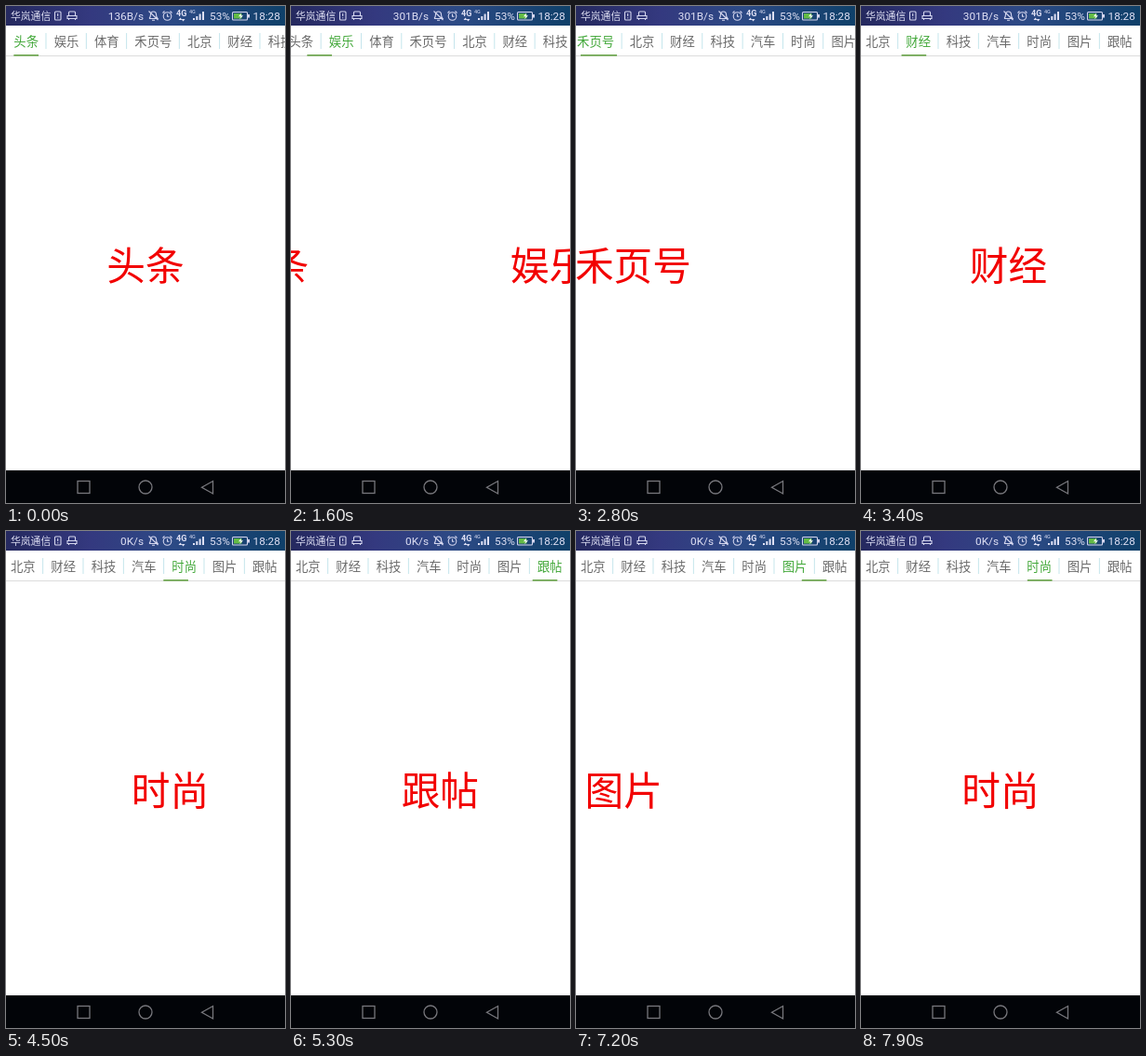
Recreate the animation shown at these times as an HTML page. Size 300 by 533 pixels, loop 8 s.

```html
<!DOCTYPE html>
<html lang="zh">
<head>
<meta charset="utf-8">
<title>Tab pager</title>
<style>
html, body { margin: 0; width: 100%; height: 100%; overflow: hidden; background: #fff; }
svg { display: block; width: 300px; height: 533px; }
text { font-family: "Noto Sans CJK SC", "Noto Sans CJK", sans-serif; }
.tab { font-size: 13.33px; fill: #6b6b6b; text-anchor: middle; }
.tab.on { fill: #43a83a; }
.page { font-size: 41.67px; fill: #f20000; text-anchor: middle; }
.bar text { fill: #dfe0f4; font-family: Roboto, "Noto Sans CJK SC", sans-serif; }
.line { fill: none; stroke: #d4d6ee; stroke-width: 1.1; }
.nav { fill: none; stroke: #77777c; stroke-width: 1.3; }
</style>
</head>
<body>
<svg viewBox="0 0 300 533">
  <defs>
    <linearGradient id="sky">
      <stop offset="0" stop-color="#25295f"/>
      <stop offset=".3" stop-color="#34397f"/>
      <stop offset=".6" stop-color="#2c4a85"/>
      <stop offset="1" stop-color="#0f4069"/>
    </linearGradient>
    <clipPath id="body"><rect y="54" width="300" height="444"/></clipPath>
  </defs>
  <rect width="300" height="533" fill="#fff"/>

  <g clip-path="url(#body)">
    <g id="pages"></g>
    <path id="glow" d="M340 53H272Q234 275 272 498H340Z" fill="#d0fbfc" stroke="#fbe2fb" stroke-width="3"/>
  </g>

  <rect y="53" width="300" height="1" fill="#dcdcdc"/>
  <g id="strip"><rect id="mark" y="52" height="1.7" fill="#6fa851"/></g>

  <g class="bar">
    <rect width="300" height="21" fill="url(#sky)"/>
    <text x="5" y="15" font-size="10.8">华岚通信</text>
    <g class="line">
      <rect x="52.5" y="6" width="6.5" height="9" rx="1"/>
      <path d="M55.7 8v3M55.7 12.2v1M67.5 10V7q0-1 1-1h5q1 0 1 1v3M66 10.5h10v3H66zM67.5 13.5v1.5M74.5 13.5v1.5"/>
      <path d="M154 13.5h9q-1.5-1.5-1.5-4.500q0-3-3-3t-3 3q0 3-1.500 4.500M157 15.300h3M153.500 5.500l10 9.500"/>
      <circle cx="173.500" cy="11" r="4.300"/>
      <path d="M173.500 8.500v2.700h2M168.500 7.500l2-2M178.500 7.500l-2-2"/>
    </g>
    <text id="speed" x="148" y="15" font-size="11.800" text-anchor="end"></text>
    <text x="183" y="11" font-size="9" font-weight="700">4G</text>
    <path d="M185.500 15l2-2.500 2 2.500zM188.500 14l2 2.500 2-2.500z" fill="#dfe0f4"/>
    <text x="197" y="8" font-size="5.500">4G</text>
    <path d="M201 15v-2h2v2zM204.300 15v-4h2v4zM207.600 15v-6.500h2v6.500zM211 15v-9h2v9z" fill="#dfe0f4"/>
    <text x="219" y="15" font-size="11.800">53%</text>
    <rect x="243.500" y="6.500" width="16" height="8.500" rx="1" class="line"/>
    <rect x="260" y="9" width="2" height="3.500" fill="#d4d6ee"/>
    <rect x="245" y="8" width="8.500" height="5.500" fill="#63bb45"/>
    <path d="M253 7.500l-3 3.700h2.500l-1.500 3 4-4h-2.500z" fill="#fff"/>
    <text x="265.500" y="15" font-size="11.800">18:28</text>
  </g>

  <rect y="498" width="300" height="35" fill="#020408"/>
  <g class="nav">
    <rect x="77" y="509.500" width="13" height="13"/>
    <circle cx="150" cy="516" r="7"/>
    <path d="M222.500 509.500v13.500L210.500 516.200z"/>
  </g>
</svg>
<script>
const LOOP = 8000, W = 300, EM = 13.333, PAD = 8.333;
const names = ["头条", "娱乐", "体育", "禾页号", "北京", "财经", "科技", "汽车", "时尚", "图片", "跟帖"];
// start, end, from page, to page
const swipes = [
  [1335, 1976, 0, 1], [1976, 2376, 1, 2], [2376, 2725, 2, 3], [2725, 3074, 3, 4],
  [3074, 3455, 4, 5], [3455, 3836, 5, 6], [3836, 4217, 6, 7], [4217, 4598, 7, 8],
  [4598, 4979, 8, 9], [4979, 5361, 9, 10], [6980, 7430, 10, 9], [7430, 7890, 9, 8]
];
const speeds = [[0, "136B/s"], [1000, "301B/s"], [4000, "0K/s"]];

const $ = id => document.getElementById(id);
const clamp = (v, lo, hi) => Math.min(hi, Math.max(lo, v));
const lerp = (a, b, k) => a + (b - a) * k;
const ease = u => 1 - (1 - u ** 1.2) ** 2;

function add(parent, tag, attrs, text = "") {
  const el = document.createElementNS("http://www.w3.org/2000/svg", tag);
  for (const k in attrs) el.setAttribute(k, attrs[k]);
  el.textContent = text;
  parent.append(el);
  return el;
}

let edge = 0;
const tabs = names.map((name, i) => {
  const left = edge, width = name.length * EM + 2 * PAD;
  edge += width;
  add($("pages"), "text", { class: "page", x: W / 2 + i * W, y: 293.5 }, name);
  if (i < names.length - 1)
    add($("strip"), "rect", { x: edge - 0.8, y: 29, width: 0.9, height: 17, fill: "#bfe3ea" });
  const el = add($("strip"), "text", { class: "tab", x: left + width / 2, y: 43 }, name);
  return { left, width, el };
});

function pageAt(t) {
  let pos = 0, on = 0;
  for (const [start, end, from, to] of swipes) {
    if (t < start) break;
    const u = clamp((t - start) / (end - start), 0, 1);
    pos = lerp(from, to, ease(u));
    on = u > 0.3 ? to : from;
  }
  return { pos, on };
}

function span(pos) {
  const i = Math.floor(pos), a = tabs[i], b = tabs[i + 1] || a;
  return { left: lerp(a.left, b.left, pos - i), width: lerp(a.width, b.width, pos - i) };
}

function glowAt(t) {
  if (t < 6550 || t > 7080) return 0;
  return t < 6650 ? clamp((t - 6550) / 50, 0, 1) : 1 - (t - 6650) / 430;
}

function draw(t) {
  const { pos, on } = pageAt(t);
  $("pages").setAttribute("transform", `translate(${-pos * W} 0)`);

  // the strip runs slightly ahead of the pages, the underline slightly behind
  const scroll = clamp(span(pageAt(t + 30).pos).left - 2 * PAD, 0, edge - W);
  $("strip").setAttribute("transform", `translate(${-scroll} 0)`);
  const m = span(pageAt(t - 55).pos);
  $("mark").setAttribute("x", m.left + PAD);
  $("mark").setAttribute("width", m.width - 2 * PAD);
  tabs.forEach((tab, i) => tab.el.classList.toggle("on", i === on));

  const g = glowAt(t);
  $("glow").setAttribute("transform", `translate(${(1 - g) * 49} 0)`);
  $("glow").setAttribute("opacity", g);
  $("speed").textContent = speeds.filter(s => s[0] <= t).pop()[1];
}

const begin = performance.now();
function tick() {
  draw((performance.now() - begin) % LOOP);
  requestAnimationFrame(tick);
}
tick();
</script>
</body>
</html>
```
